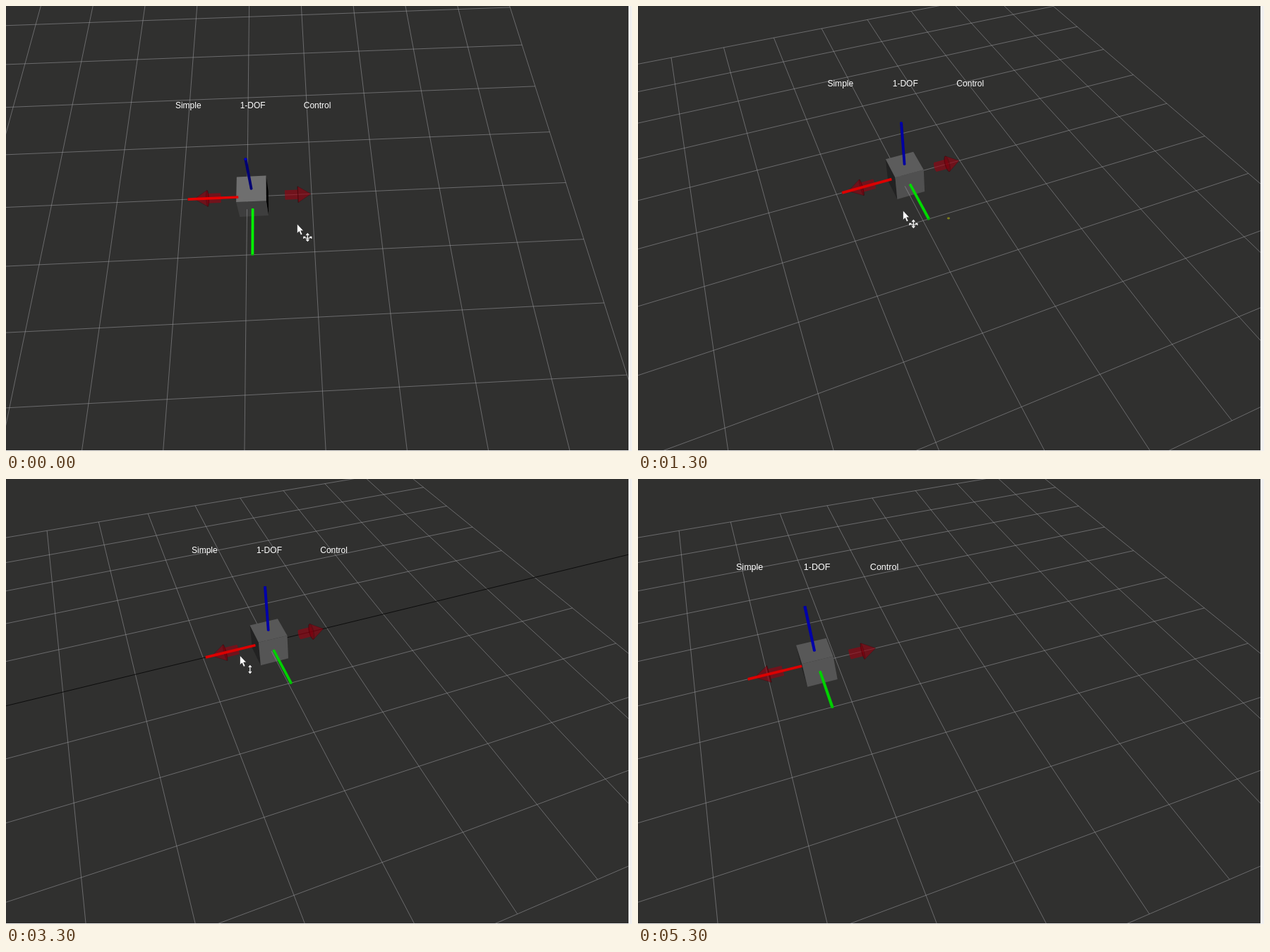
These frames come from a looping animation (887x631 px, 6100 ms). An HTML page:

```html
<!DOCTYPE html>
<html lang="en">
<head>
<meta charset="utf-8">
<title>Simple 1-DOF control</title>
<style>
  html, body { margin: 0; width: 100%; height: 100%; overflow: hidden; background: #f2f1f0; }
  svg { display: block; position: absolute; left: 0; top: 0; background: #30302f; }
  text { font-family: "Liberation Sans", Arial, sans-serif; fill: #fff; text-anchor: middle; }
</style>
</head>
<body>
<svg id="view" width="882" height="630" viewBox="0 0 882 630"></svg>
<script>
const LOOP = 6100, STEP = 100;
const FOCAL = 794, CX = 441, CY = 301;
const TARGET = [1.125, 0.73, -2.1], DISTANCE = 10.9;
const HALF = 0.225, ROD = 0.02;
const RAD = Math.PI / 180;

// A track starts at a value and makes straight moves; between moves it rests.
const move = (from, to, ...value) => ({ from, to, value });
const track = (first, ...moves) => t => moves.reduce((now, m) => {
  const p = Math.min(1, Math.max(0, (t - m.from) / (m.to - m.from)));
  return now.map((v, i) => v + (m.value[i] - v) * p);
}, first);

const orbitAt = track([2.97, 60.87], // yaw, pitch in degrees
  move(600, 700, 13.43, 58.6),
  move(900, 1300, 22.65, 46.65),
  move(1300, 1700, 21.57, 43.93));

const slideAt = track([0.087],
  move(2110, 2900, -1.786),
  move(2900, 3500, 0.95),
  move(3600, 3900, -1.56),
  move(4000, 4300, -1.13),
  move(4400, 4700, -1.69),
  move(4800, 5000, -1.275));

const pointerAt = track([412, 309],
  move(100, 400, 320, 327),
  move(600, 700, 350, 320),
  move(900, 1300, 375, 290),
  move(1300, 2200, 314, 242),
  move(2200, 2900, 133, 281),
  move(2900, 3500, 430, 235),
  move(3600, 4300, 185, 277),
  move(4800, 5200, 300, 42));

// Orbit camera
const cam = {};
function aim(yaw, pitch) {
  cam.sy = Math.sin(yaw * RAD); cam.cy = Math.cos(yaw * RAD);
  cam.sp = Math.sin(pitch * RAD); cam.cp = Math.cos(pitch * RAD);
  // Direction towards the camera, which also carries the light
  cam.back = [-cam.sy * cam.cp, -cam.cy * cam.cp, cam.sp];
}
function project([x, y, z]) {
  const u = x - TARGET[0], v = y - TARGET[1], w = z - TARGET[2];
  const side = u * cam.cy - v * cam.sy, ahead = u * cam.sy + v * cam.cy;
  const k = FOCAL / (DISTANCE + ahead * cam.cp - w * cam.sp);
  return [CX + side * k, CY - (ahead * cam.sp + w * cam.cp) * k, k];
}

// Outlines
const fmt = p => p[0].toFixed(2) + " " + p[1].toFixed(2);
const line = (a, b) => "M" + fmt(project(a)) + "L" + fmt(project(b));
const outline = pts => "M" + pts.map(fmt).join("L") + "Z";

function hull(pts) {
  const sorted = pts.slice().sort((a, b) => a[0] - b[0] || a[1] - b[1]);
  const cross = (o, a, b) => (a[0] - o[0]) * (b[1] - o[1]) - (a[1] - o[1]) * (b[0] - o[0]);
  const half = list => {
    const out = [];
    for (const p of list) {
      while (out.length > 1 && cross(out[out.length - 2], out[out.length - 1], p) <= 0) out.pop();
      out.push(p);
    }
    return out.slice(0, -1);
  };
  return half(sorted).concat(half(sorted.reverse()));
}
// Regular polygon around an axis of the marker
function ring(axis, at, radius, slide, count = 20, turn = 0) {
  return Array.from({ length: count }, (_, i) => {
    const p = [0, 0, 0], angle = turn + i * 2 * Math.PI / count;
    p[axis] = at;
    p[(axis + 1) % 3] = radius * Math.cos(angle);
    p[(axis + 2) % 3] = radius * Math.sin(angle);
    p[0] += slide;
    return project(p);
  });
}
const rod = (axis, a, ra, b, rb, slide) =>
  outline(hull(ring(axis, a, ra, slide).concat(ring(axis, b, rb, slide))));

// Scene elements, back to front
const view = document.getElementById("view");
function add(tag, attrs, parent = view) {
  const el = document.createElementNS("http://www.w3.org/2000/svg", tag);
  for (const name in attrs) el.setAttribute(name, attrs[name]);
  return parent.appendChild(el);
}
const setD = (el, d) => el.setAttribute("d", d);
const show = (el, on) => el.setAttribute("visibility", on ? "visible" : "hidden");
const addArrow = dir => ({
  dir,
  shaft: add("path", { fill: "#9c0010", "fill-opacity": 0.6 }),
  head: add("path", { fill: "#940010", "fill-opacity": 0.62, stroke: "#400008", "stroke-opacity": 0.3 }),
  base: add("path", { fill: "#400004", "fill-opacity": 0.2, stroke: "#400004", "stroke-opacity": 0.25 })
});

const gridStyle = { fill: "none", stroke: "#a0a0a4", "stroke-opacity": 0.52 };
const grid = add("path", gridStyle);
const rail = add("path", { stroke: "#0c0c0c" });
const dot = add("ellipse", { cx: 440, cy: 301, rx: 2, ry: 1.4, fill: "#80801a" });
const farArrow = addArrow(1);
const faces = [
  { axis: 0, sign: -1 }, { axis: 0, sign: 1 }, { axis: 1, sign: -1 }, { axis: 2, sign: 1 }
].map(f => ({ ...f, el: add("path") }));
const nearGrid = add("path", gridStyle);
const nearArrow = addArrow(-1);
const axes = [
  { axis: 0, sign: -1, color: [228, 0, 0] },
  { axis: 1, sign: -1, color: [0, 280, 0] },
  { axis: 2, sign: 1, color: [0, 0, 235] }
].map(a => ({ ...a, el: add("path"), cap: add("path") }));
const labels = ["Simple", "1-DOF", "Control"].map(word => {
  const el = add("text");
  el.textContent = word;
  return el;
});

const pointer = add("g");
add("path", {
  d: "M.5 0V13.4L3.4 10.5L5.7 15.8L8 14.8L5.7 9.7H9.6Z",
  fill: "#fff", stroke: "#222", "stroke-width": 0.6
}, pointer);
const ink = { fill: "none", stroke: "#fff", "stroke-width": 1.2 };
const upDown = "M0 -5V5M-2 -3L0 -5.3L2 -3M-2 3L0 5.3L2 3";
const sideways = "M-5.5 -.5Q0 3.5 5.5 -.5M-5.5 2V-.7H-3M5.5 2V-.7H3";
const orbitIcon = add("path", { ...ink, d: upDown + sideways, transform: "translate(15.3 19)" }, pointer);
const slideIcon = add("path", { ...ink, d: upDown, transform: "translate(14.8 19.6)" }, pointer);

function drawGrid(dragging) {
  let back = "", front = "";
  for (let i = -5; i <= 5; i++) {
    if (i || !dragging) back += line([-5, i, 0], [5, i, 0]);
    back += line([i, -HALF, 0], [i, 5, 0]);
    front += line([i, -5, 0], [i, -HALF, 0]);
  }
  setD(grid, back);
  setD(nearGrid, front);
  setD(rail, line([-6, 0, 0], [12, 0, 0]));
  show(rail, dragging);
}

function drawArrow({ dir, shaft, head, base }, slide) {
  setD(shaft, rod(0, 0.5 * dir, 0.075, 0.7 * dir, 0.075, slide));
  setD(head, rod(0, 0.7 * dir, 0.125, 0.9 * dir, 0.001, slide));
  setD(base, outline(ring(0, 0.7 * dir, 0.125, slide)));
}

function drawCube(slide) {
  const eye = TARGET.map((v, i) => v + cam.back[i] * DISTANCE);
  eye[0] -= slide;
  for (const { axis, sign, el } of faces) {
    const gray = Math.round(127 * Math.max(0, cam.back[axis] * sign));
    setD(el, outline(ring(axis, sign * HALF, HALF * Math.SQRT2, slide, 4, Math.PI / 4)));
    el.setAttribute("fill", `rgb(${gray},${gray},${gray})`);
    show(el, eye[axis] * sign > HALF);
  }
}

function drawAxes(slide) {
  const tint = (color, k) => `rgb(${color.map(c => Math.min(255, Math.round(c * k)))})`;
  for (const { axis, sign, color, el, cap } of axes) {
    const facing = cam.back[axis] * sign;
    setD(el, rod(axis, HALF * sign, ROD, sign, ROD, slide));
    setD(cap, outline(ring(axis, sign, ROD, slide)));
    el.setAttribute("fill", tint(color, Math.sqrt(1 - facing * facing)));
    cap.setAttribute("fill", tint(color, Math.max(0.6, facing)));
  }
}

// The words face the viewer, one unit apart, above the marker
function drawLabels(slide) {
  const [x, y, k] = project([slide, 0, 0]);
  const size = 0.1312 * k;
  labels.forEach((el, i) => {
    el.setAttribute("x", x + (i - 1) * k);
    el.setAttribute("y", y - 1.42 * k + 0.36 * size);
    el.setAttribute("font-size", size);
  });
}

function drawPointer(t) {
  const sliding = t >= 2000 && t < 5100;
  pointer.setAttribute("transform", `translate(${pointerAt(t)})`);
  pointer.setAttribute("display", t < 5300 ? "inline" : "none");
  show(orbitIcon, !sliding);
  show(slideIcon, sliding);
}

function draw(ms) {
  const t = Math.floor((ms % LOOP) / STEP) * STEP;
  const [slide] = slideAt(t);
  aim(...orbitAt(t));
  drawGrid(t >= 2200 && t < 5100);
  drawArrow(farArrow, slide);
  drawCube(slide);
  drawArrow(nearArrow, slide);
  drawAxes(slide);
  drawLabels(slide);
  show(dot, t >= 500 && t < 1700);
  drawPointer(t);
}

const start = performance.now();
function tick() {
  draw(performance.now() - start);
  requestAnimationFrame(tick);
}
tick();
</script>
</body>
</html>
```
